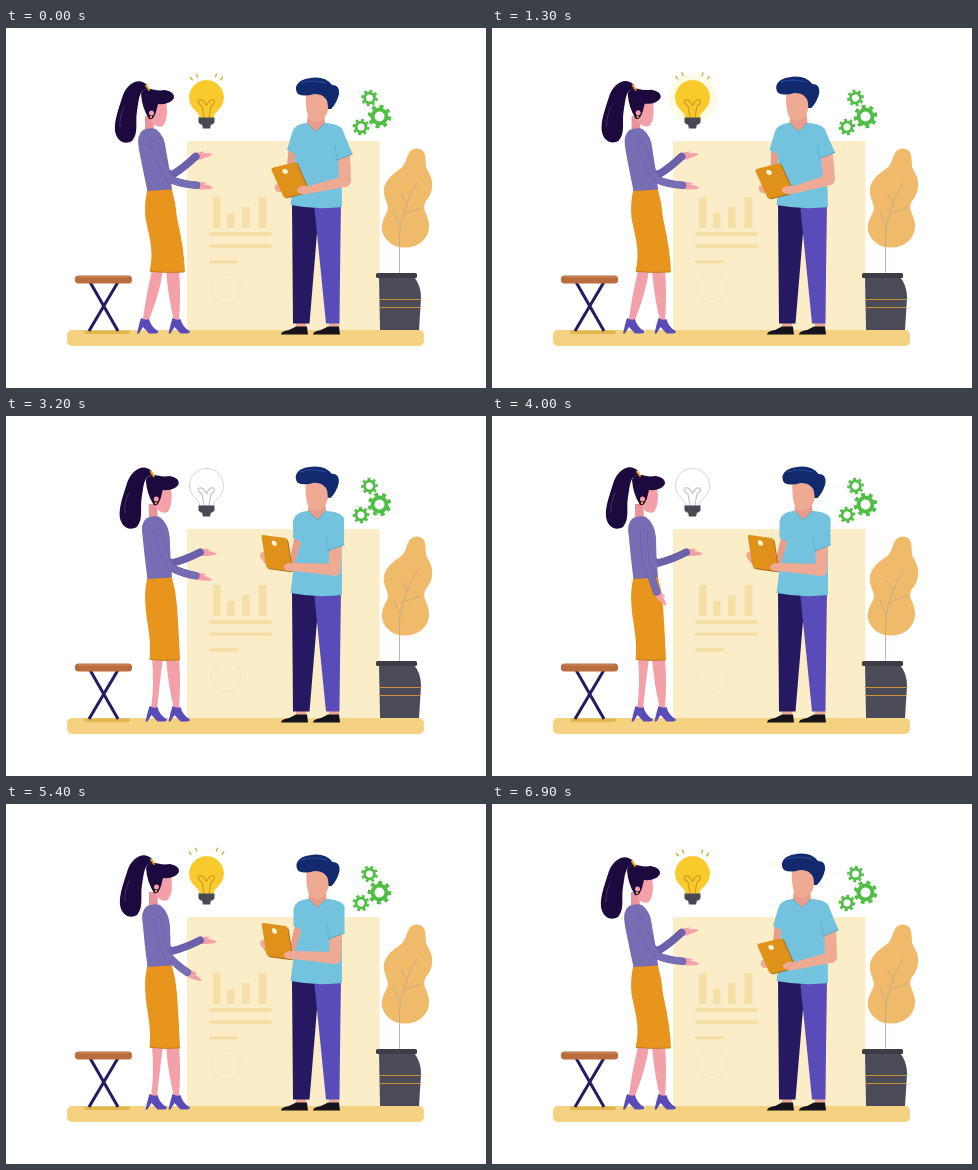
Recreate the animation shown at these times as an HTML page. Size 480 by 360 pixels, loop 7 s.

```html
<!DOCTYPE html>
<html lang="en">
<head>
<meta charset="utf-8">
<title>Sharing an idea</title>
<style>
html, body { margin: 0; width: 100%; height: 100%; overflow: hidden; background: #fff; }
svg { display: block; width: 100vw; height: 100vh; }
</style>
</head>
<body>
<svg viewBox="0 0 480 360">
  <rect x="181" y="113" width="192.5" height="190" fill="#faedc7"/>
  <g fill="#f4dfa7">
    <path d="M207 169h7.5v31h-7.5zM221 185h7.5v15h-7.5zM236 179h7.5v21h-7.5zM252.5 169h8v31h-8z"/>
    <rect x="203" y="204" width="63" height="4" rx="2"/>
    <rect x="203" y="216.5" width="63" height="3.5" rx="1.7"/>
    <rect x="203" y="232" width="29" height="3.5" rx="1.7"/>
  </g>
  <circle cx="220" cy="261" r="15" fill="none" stroke="#f7e7bc"/>
  <rect x="61" y="302" width="357" height="16" rx="5" fill="#f5d281"/>
  <rect x="78" y="302.5" width="46" height="3.5" rx="1.7" fill="#e2b750"/>

  <path d="M84 254L112 303M112 254L83 303" stroke="#241b60" stroke-width="3"/>
  <rect x="69" y="247.5" width="57" height="8" rx="3.5" fill="#b96c3e"/>
  <path d="M72 249H123" stroke="#c98053" stroke-width="1.5"/>

  <path d="M411 120.500C399 121 403 135 394 141C385 147 376 155 378 166C380 176 385 178 379 188C374 197 375 206 381 212C387 219 394 219.500 400 219.500C414 219 424 209 423 196C422 185 415 182 420 173C428 164 428 152 422 143C417 136 424 122 411 120.500Z" fill="#efba69"/>
  <path d="M393.500 246V205Q396 180 411 155M394 199L388 184M397 186L415 180M401 175L395 165" fill="none" stroke="#bda98a" stroke-width=".8"/>
  <path d="M373 249H408Q415 257 415 270L413 302H374Z" fill="#4b4a57"/>
  <rect x="370" y="245" width="41" height="5" rx="1.5" fill="#3d3c47"/>
  <path d="M373 271.5H415M373 279.5H414" stroke="#c9913f" stroke-width="1.2"/>

  <g id="scene"></g>
</svg>
<script>
const LOOP = 7000, STEP = 100;
const SKIN = '#f3a0a8', TAN = '#efaa94', PURPLE = '#766db4', VIOLET = '#5a4cb8', SHIRT = '#73c3df';

const mix = (a, b, k) => a + (b - a) * k;
const clamp = v => Math.max(0, Math.min(1, v));
const ease = (t, from, to) => { const u = clamp((t - from) / (to - from)); return u * u * (3 - 2 * u); };
// Rises from 0 to 1, holds, and falls back.
const swell = (t, rise, top, fall, end) => ease(t, rise, top) - ease(t, fall, end);

const shape = (d, fill) => `<path d="${d}" fill="${fill}"/>`;
const line = (d, color, width) =>
  `<path d="${d}" fill="none" stroke="${color}" stroke-width="${width}" stroke-linecap="round" stroke-linejoin="round"/>`;
const dot = (x, y, r, fill, extra = '') => `<circle cx="${x}" cy="${y}" r="${r}" fill="${fill}" ${extra}/>`;
const group = (transform, body) => `<g transform="${transform}">${body}</g>`;

function bulb(t) {
  const lit = t < 2600 || t >= 4900;
  const glow = swell(t, 300, 1100, 2200, 2600);
  const burst = 18 * swell(t, 4700, 5000, 5000, 5400);
  const reach = 23 + burst + 2 * swell(t, 0, 2100, 5400, 6900);
  const ray = angle => group(`rotate(${angle} 200.5 70)`, line(`M200.5 ${70 - reach}v-3`, '#d9a526', 1.3));
  const edge = lit ? '#f8ca2b' : '#c9c9cd';
  return (lit ? dot(201, 70.5, 24, '#fffae0', `opacity="${glow}"`) + [-38, -23, 23, 38].map(ray).join('') : '')
    + `<path d="M194 90Q194 86 189 82A17 17 0 1 1 212 82Q207 86 207 90Z" fill="${lit ? edge : '#fff'}" stroke="${edge}" stroke-width=".8"/>`
    + line('M198 89L196 78Q191 75 193 72Q198 71 200 77H201Q203 71 208 72Q210 75 205 78L203 89', lit ? '#cf9a25' : '#c4c4c8', 1.2)
    + shape('M192.5 89.5h16v5l-2 2h-1.5l-1 4h-7l-1-4h-1.5l-2-2z', '#494853');
}

function gear(x, y, r, turn) {
  const ring = (radius, width, dash) => `<circle r="${radius}" fill="none" stroke="#50bd45" stroke-width="${width}" ${dash}/>`;
  return group(`translate(${x} ${y}) rotate(${turn})`,
    ring(r * .58, r * .33, '') + ring(r * .85, r * .27, 'pathLength="16" stroke-dasharray="1"'));
}

// A sleeved forearm swung from the elbow, with its hand.
function reach(startX, startY, elbowX, elbowY, angle, length, handAngle, color) {
  const a = angle * Math.PI / 180;
  const x = elbowX + length * Math.cos(a), y = elbowY + length * Math.sin(a);
  const sleeve = `M${startX} ${startY}Q${elbowX - 5} ${elbowY - 3} ${elbowX} ${elbowY}Q${mix(elbowX, x, .5)} ${mix(elbowY, y, .5) + 2} ${x} ${y}`;
  return group(`translate(${x} ${y}) rotate(${handAngle})`,
      shape('M-3 -2.5Q3 -4 9 -4Q10 -3 7 -2Q13 -2 17 0Q16 2 5 3.5Q0 4 -3 2.5Z', SKIN))
    + line(sleeve, '#655ba5', 7.6) + line(sleeve, color, 6.8);
}

function woman(t) {
  const stance = swell(t, 2100, 3200, 5600, 6900);
  const drift = swell(t, 600, 3600, 5600, 6900);
  const drop = swell(t, 3200, 4000, 4400, 6200);
  const lean = 4 * drift - 1, ankle = 139 + 8.5 * stance;
  const nearAngle = 12 + 6 * stance + 54 * drop;
  const hem = mix(179, 174, stance);
  const shoe = x => group(`translate(${x} 290)`,
    shape('M-4 0Q1 3 4 1Q6 9 13 13Q14 15.5 10 15.5H4L-2 9L-6 15.5H-8Q-6 6 -4 0Z', VIOLET));
  const legs = shape(`M146 242H157Q154 265 ${ankle + 3.5} 293H${ankle - 2.5}Q${ankle + 1} 268 146 242Z`, SKIN)
    + shape('M160 242H173Q175 265 173 293H168Q162 268 160 242Z', SKIN) + shoe(ankle) + shoe(170.5);
  const skirt = shape(`M141.5 161L165.5 160Q170 175 171 190Q${hem - 1} 220 ${hem} 244Q160 245.5 143.5 243.5C${mix(149, 146, stance)} 222 ${mix(142, 140, stance)} 205 139.5 190Q138 175 141.5 161Z`, '#e8951d')
    + line(`M144.5 243.5Q160 245 ${hem - 1} 244`, '#bb7228', .8);
  const torso = shape(`M${138 + lean} 102Q${145 + lean} 99 ${151 + lean} 101Q${160 + lean} 108 ${161 + lean} 122Q164 142 166 161.5L141.5 163Q${137 + lean * .5} 140 ${134 + lean} 122Q${131 + lean} 107 ${138 + lean} 102Z`, PURPLE);
  const neck = shape(`M${140 + lean} 88H${148 + lean}L${149 + lean} 102Q${144 + lean} 104 ${140 + lean} 102Z`, '#ea9299');
  const hair = '#1c0a3e';
  const head = group(`translate(${5 * drift} ${-2 * drift})`,
    shape('M141 57C133 49 122 55 117 67C113 80 108 92 109 103C111 114 119 117 126 113C133 105 129 94 131 83C133 71 133 62 141 61Z', hair)
    + line('M114 99Q113 90 118 79', '#4a3a6a', .8)
    + shape('M146 73H160Q163 90 157 98Q150 101 144 92Z', SKIN)
    + shape('M135 66Q137 59 147 61.5Q153 63 159 62Q169 64 168 70Q164 77 152 76L150 84Q147 93 143 91Q136 80 135 66Z', hair)
    + line('M140 57.5L143 62', '#e8951d', 2)
    + dot(145.5, 85, 2.5, SKIN) + dot(145, 89, 1.2, '#f0a21d'));
  return reach(157, 145, 166, 147, -38 + 17 * stance, 30, -9 + 13 * stance, '#6a60ab')
    + legs + skirt + neck + torso + head
    + reach(149 + lean, 117, 166 - 9 * drop, 152, nearAngle, 25, nearAngle * .75, PURPLE);
}

function man(t) {
  const lean = swell(t, 500, 2100, 2100, 3400);
  const raise = swell(t, 2100, 3200, 5500, 6900);
  const pose = (rest, leaned, raised) => rest + leaned * lean + raised * raise;
  const d = pose(0, -7, 1.5), cuff = pose(281, -7, 6.5);
  const sx = pose(339, -7, -8), sy = pose(128, -3, 3);
  const ex = pose(339, -4, -10), ey = pose(153, -3, 1);
  const wx = pose(303, -2, -13), wy = pose(162, 0, -11);
  const tx = pose(284, -4, -13), ty = pose(152, 2, -15);

  const leg = (left, d, color) => shape(`M${left + 5} 290h10v12h-10z`, TAN) + shape(d, color);
  const shoe = x => shape(`M${x} 306.5Q${x} 303 ${x + 8} 302L${x + 15} 298.5H${x + 26}L${x + 27} 306.5Z`, '#15131c');
  const lower = leg(285, 'M286 176H313L311 205L303.5 295.500H287Z', '#251a61')
    + leg(318, 'M308 176H335Q334 240 333.5 295.500H320Q314 235 308 176Z', VIOLET) + shoe(275) + shoe(307);

  const farArm = line(`M${cuff + 5} 122L${mix(cuff, 285, .5) + 1} 144L${tx - 10} ${ty + 7}`, '#e79d89', 7);
  const cuffLine = `L${sx - 8} ${sy + 4}L${sx + 7.5} ${sy - 2}`;
  const shoulder = `L${337 + d} 103Q${335 + d} 96.5 ${319 + d} 95`;
  const shirt = shape(`M${300 + d} 95Q${288 + d} 96 ${286 + d} 105L${cuff} 122L${cuff + 8} 126L288 150L284.5 177Q310 182 336 179Q336 155 ${335 + d * .5} 130${shoulder}Z`, SHIRT);
  const sleeve = shape(`M${322 + d} 112${cuffLine}${shoulder}Z`, SHIRT)
    + line(`M${sx - 8} ${sy + 4}${cuffLine}`, '#559fba', .8)
    + line(`M${sx - 8} ${sy + 4}l-2 -14`, '#5cadca', .8);
  const neck = shape(`M${302 + d} 86H${318 + d}L${319 + d} 95L${310 + d} 104L${301 + d} 95Z`, '#e89d8a')
    + line(`M${301 + d} 95L${310 + d} 104L${319 + d} 95`, '#5cadca', 1);
  const head = group(`translate(${pose(0, -11.5, .5)} ${pose(0, -2, 1)})`,
    shape('M300 65Q312 60 324 68L322 82Q320 90 314 93Q305 96 302 88Q299 78 300 65Z', TAN)
    + shape('M292 66C287 59 292 52 302 50.5Q318 47 326 57Q334 57 333 66Q331 75 325 81L322 81Q322 72 319 70Q316 66 308 66Q298 69 292 66Z', '#12296d')
    + line('M295 55Q305 51 320 55', '#2b5aa5', .8));

  const tablet = group(`translate(${tx} ${ty}) rotate(${pose(-14, -1, 22)}) skewX(${pose(10, 0, 7)})`,
    dot(-13.5, 5, 4.2, TAN)
    + '<rect x="-12" y="-15" width="26" height="32" rx="2" fill="#ac6a1d"/>'
    + '<rect x="-13" y="-16" width="26" height="32" rx="2" fill="#e0911a"/>'
    + dot(-1, -9.5, 2.6, '#fff5dc'));
  const upperArm = line(`M${sx - 1} ${sy - 4}L${ex} ${ey}`, TAN, 12);
  const forearm = shape(`M${ex + 2} ${ey - 6}L${wx} ${wy - 4}L${wx - 7} ${wy - 4}Q${wx - 13} ${wy - 2} ${wx - 12} ${wy + 1}Q${wx - 9} ${wy + 5} ${wx - 2} ${wy + 4}L${ex} ${ey + 6}Z`, TAN);
  return farArm + lower + shirt + neck + head + tablet + upperArm + forearm + sleeve;
}

const scene = document.getElementById('scene');
let shown = -1;

function draw() {
  const t = Math.floor(performance.now() % LOOP / STEP) * STEP;
  if (t !== shown) {
    shown = t;
    const turn = t / LOOP * 360;
    scene.innerHTML = bulb(t)
      + gear(363.5, 70, 8.5, turn) + gear(373.5, 88.5, 12, -turn) + gear(355, 99, 8.5, turn)
      + woman(t) + man(t);
  }
  requestAnimationFrame(draw);
}
draw();
</script>
</body>
</html>
```
